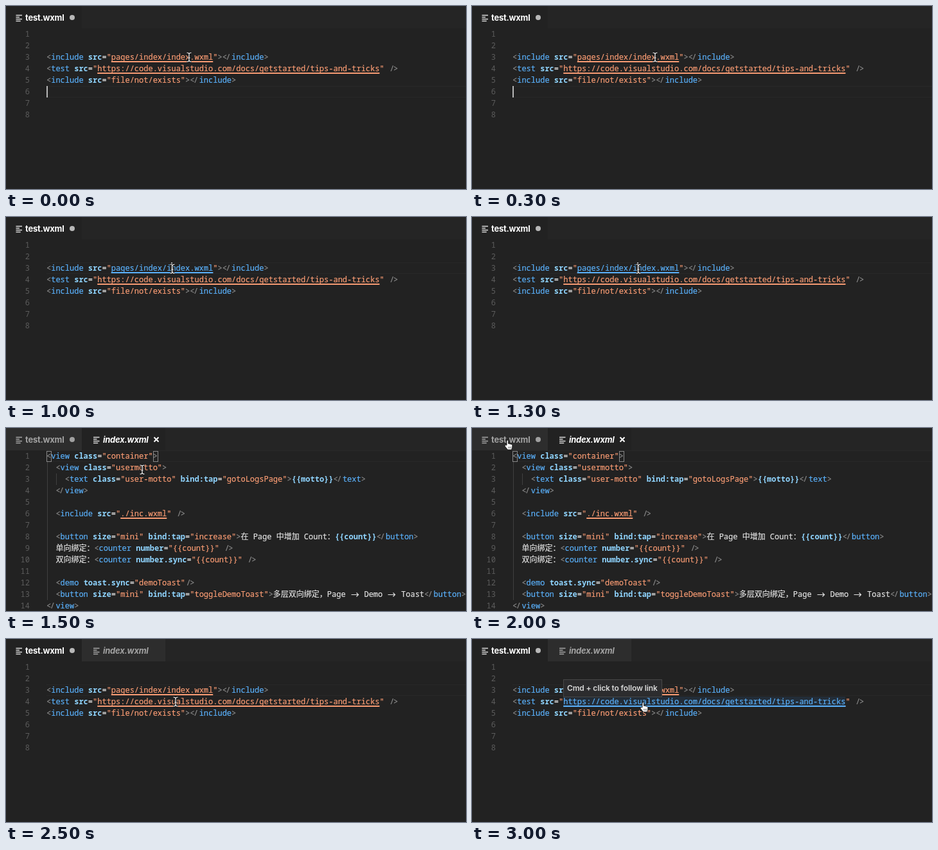
An HTML page that plays this animation: 716 by 286 pixels, repeating every 3.5 s.

```html
<!DOCTYPE html>
<html lang="zh-CN">
<head>
<meta charset="utf-8">
<title>Follow links in wxml</title>
<style>
@property --scene { syntax: "<integer>"; inherits: true; initial-value: 0; }
@keyframes play { to { --scene: 7; } }

html, body { margin: 0; width: 100%; height: 100%; overflow: hidden; background: #222; }
#stage {
  position: relative; width: 716px; height: 286px; overflow: hidden; background: #222;
  animation: play 3500ms steps(7) infinite;
}
#stage div, #stage svg { position: absolute; box-sizing: border-box; }

/* shown while --from <= scene <= --to */
.on { opacity: calc(1 - max(var(--from) - var(--scene), var(--scene) - var(--to))); }
.layer { left: 0; top: 0; width: 716px; height: 286px; }

.bar { left: 0; top: 0; width: 716px; height: 35px; background: #252525; }
.tab {
  top: 0; height: 35px; background: #2d2d2d; color: #a2a2a2;
  font: 650 13px/36px Inter, sans-serif; letter-spacing: -.25px; white-space: pre;
}
.tab.active { background: #222; color: #fff; }
.tab svg { left: 0; top: 0; }
.name { top: 0; }
.preview { font-style: italic; }

.code, .link, .num {
  font: 500 12px/18px "Noto Sans Mono", "Noto Sans CJK SC", monospace;
  font-variant-ligatures: none; white-space: pre; color: #e2e2e2;
}
.code, .link { -webkit-text-stroke: .2px; }
.code { left: 63px; height: 18px; }
#stage .num { left: 0; width: 37px; text-align: right; color: #5c5c5c; }
.p { color: #8c8c8c; }
.p i { font-style: normal; position: relative; }
.t { color: #5ab0fa; }
.a { color: #90d5ff; font-weight: 600; -webkit-text-stroke: 0; }
.s { color: #f89b73; }
u { text-decoration: underline 2px; text-underline-offset: 2px; text-decoration-skip-ink: none; }
.arrow { display: inline-block; width: 14.4px; height: 18px; vertical-align: top; }
#stage .arrow { position: static; }

.link { height: 17px; margin-top: 1px; color: #5ab0fa; background: #222; line-height: 16px; }
.hover { background: #232d38; }
.row { left: 63px; width: 653px; height: 18px; border: solid #282828; border-width: 1px 0; }
.caret { width: 2px; height: 18px; background: #b8b8b8; }
.match { width: 8px; height: 17px; border: 1px solid #888; }
.guide { width: 1px; background: #404040; }
.tip {
  width: 154px; height: 28px; padding-left: 5px; background: #2c2c2e; border: 1px solid #474747;
  color: #d8d8d8; font: 600 12px/26px Inter, sans-serif; letter-spacing: -.15px; white-space: pre;
}
</style>
</head>
<body>
<div id="stage"></div>
<script>
const CHAR = 7.2, LEFT = 63;
const lineTop = n => 35 + (n - 1) * 18;
const colX = n => LEFT + n * CHAR;
const box = (cls, x, y, body = '', style = '') =>
  `<div class="${cls}" style="left:${x}px;top:${y}px;${style}">${body}</div>`;
const show = (from, to, body) =>
  `<div class="layer on" style="--from:${from};--to:${to}">${body}</div>`;
const span = (cls, text) => `<span class="${cls}">${text}</span>`;

const PAGE = 'pages/index/index.wxml';
const URL_TEXT = 'https://code.visualstudio.com/docs/getstarted/tips-and-tricks';
const testLines = ['', '',
  `<include src="${PAGE}"></include>`,
  `<test src="${URL_TEXT}" />`,
  '<include src="file/not/exists"></include>',
  '', '', ''];
const indexLines = [
  '<view class="container">',
  '  <view class="usermotto">',
  '    <text class="user-motto" bind:tap="gotoLogsPage">{{motto}}</text>',
  '  </view>',
  '',
  '  <include src="./inc.wxml" />',
  '',
  '  <button size="mini" bind:tap="increase">在 Page 中增加 Count：{{count}}</button>',
  '  单向绑定：<counter number="{{count}}" />',
  '  双向绑定：<counter number.sync="{{count}}" />',
  '',
  '  <demo toast.sync="demoToast"/>',
  '  <button size="mini" bind:tap="toggleDemoToast">多层双向绑定，Page -> Demo -> Toast</button>',
  '</view>'];

const ARROW = '<svg class="arrow" viewBox="0 0 14.4 18"><path d="M1.5 9.5H12.5M9.5 6.5L12.5 9.5L9.5 12.5" fill="none" stroke="#e2e2e2" stroke-width="1.2"/></svg>';
const slash = dx => `<i style="left:${dx}px">/</i>`;

function paint(line) {
  const token = /->|(<\/?)(\w+)|([\w:.]+)="([^"]*)"|(\/?>)|({{\w+}})/g;
  return line.replace(token, (all, open, tag, attr, value, close, expr) => {
    if (open) return span('p', '&lt;' + (open[1] ? slash(-1.5) : '')) + span('t', tag);
    if (attr) {
      const linked = /^(pages|https:|\.)/.test(value);
      return span('a', attr) + '=' + span('s', `"${linked ? `<u>${value}</u>` : value}"`);
    }
    if (close) return span('p', (close[1] ? slash(1.5) : '') + '&gt;');
    return expr ? span('a', expr) : ARROW;
  });
}

const code = lines => lines.map((line, i) =>
  box('num', 0, lineTop(i + 1), i + 1) + box('code', LEFT, lineTop(i + 1), paint(line))).join('');

function tab(name, x, width, active, mark) {
  const tone = active ? '#dcdcdc' : '#a8a8a8';
  const marks = {
    dot: `<circle cx="103" cy="18" r="4" fill="${active ? '#b8b8b8' : '#a0a0a0'}"/>`,
    close: '<path d="M112.5 14.5l7 7m0-7l-7 7" stroke="#fff" stroke-width="2"/>'
  };
  const iconX = x ? 18 : 15.5;
  const icon = `<path d="M${iconX} 14.5h9.5m-9.5 3h5.5m-5.5 3h9.5m-9.5 3h7.2" stroke="${tone}" stroke-width="1.3" fill="none"/>`;
  return box(`tab${active ? ' active' : ''}`, x, 0,
    `<svg width="${width}" height="35">${icon}${marks[mark] || ''}</svg>` +
    box(`name${x ? ' preview' : ''}`, x ? 33 : 30, 0, name), `width:${width}px`);
}
const tabs = (testActive, index) => '<div class="bar">' +
  tab('test.wxml', 0, 118, testActive, 'dot') + index + '</div>';
const indexTab = active => tab('index.wxml', 118, 130, active, active && 'close');

const link = (text, col, n, cls = '') => box('link ' + cls, colX(col), lineTop(n), `<u>${text}</u>`);
const row = n => box('row', LEFT, lineTop(n));
const tip = (col, n) => box('tip', Math.round(colX(col)), lineTop(n) - 26, 'Cmd + click to follow link');
const caret = (col, n) => box('caret', colX(col), lineTop(n));
const match = col => box('match', colX(col), lineTop(1) + 1);
const guide = (col, n, rows) => box('guide', Math.round(colX(col)) + 1, lineTop(n), '', `height:${rows * 18}px`);

const svg = (x, y, body) =>
  `<svg width="16" height="20" style="left:${x}px;top:${y}px">${body}</svg>`;
const hand = (x, y) => svg(x, y,
  '<path d="M4 9V2.2a1.3 1.3 0 0 1 2.6 0V6.5l1.2-.2.9.7 1.2-.2.9.8 1-.1 1 1V12l-1.2 4H5.5L1 10.2Q.8 8.6 2.4 8.6Z" fill="#fff" stroke="#111" stroke-width=".9"/>' +
  '<path d="M6.7 11v3M8.6 11v3M10.4 11v3" stroke="#333" stroke-width=".6"/>');
function beam(x, y) {
  const d = 'M1.5 2Q5 2 5 4.5V13.5Q5 16 1.5 16M8.5 2Q5 2 5 4.5M8.5 16Q5 16 5 13.5M3.5 10h3';
  const stroke = (color, w) => `<path d="${d}" fill="none" stroke="${color}" stroke-width="${w}"/>`;
  return svg(x - 5, y - 9, stroke('#111', 2.8) + stroke('#fff', 1.2));
}

document.getElementById('stage').innerHTML =
  show(0, 2, tabs(true, '')) +
  show(3, 4, tabs(false, indexTab(true))) +
  show(5, 6, tabs(true, indexTab(false))) +
  show(0, 2, code(testLines)) +
  show(5, 6, code(testLines)) +
  show(3, 4, row(1) + guide(0, 2, 12) + guide(2, 3, 1) + match(0) + match(23) + code(indexLines)) +
  show(0, 1, row(6) + caret(0, 6)) +
  show(0, 0, beam(285, 80)) +
  show(1, 1, link(PAGE, 14, 3, 'hover') + tip(14, 3) + hand(256, 82)) +
  show(2, 2, link(PAGE, 14, 3) + row(3) + caret(27, 3) + beam(259, 81)) +
  show(3, 3, beam(212, 65)) +
  show(4, 4, hand(50, 18)) +
  show(5, 6, row(3)) +
  show(5, 5, beam(264, 98)) +
  show(6, 6, link(URL_TEXT, 11, 4, 'hover') + tip(11, 4) + hand(261, 98));
</script>
</body>
</html>
```
